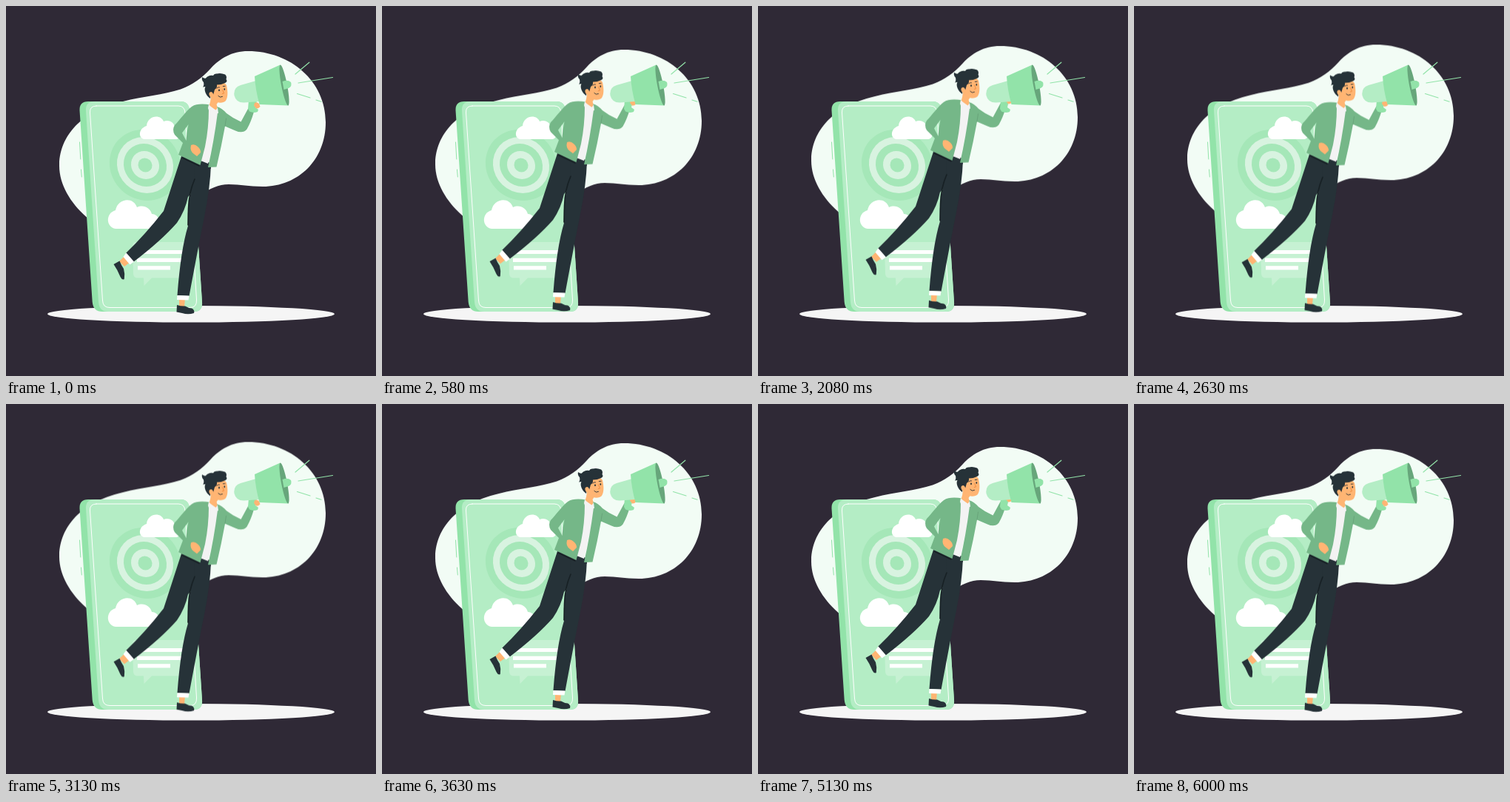
An HTML page for the animation above (6.04 s loop, 500 px wide and 500 px high).

```html
<!DOCTYPE html>
<html lang="en">
<head>
<meta charset="utf-8">
<title>Announcement</title>
<style>
  html, body { margin: 0; width: 100%; height: 100%; overflow: hidden; background: #2f2936; }
  svg { display: block; width: 100vw; height: 100vh; }
  .pale { fill: #f2fcf5; }
  .mint { fill: #b4edc5; }
  .green { fill: #92e3a9; }
  .ring { fill: #a5e7b8; }
  .glow { fill: #d8f3e0; }
  .bubble { fill: #c6f1d3; }
  .jacket { fill: #75b788; fill-rule: evenodd; }
  .dark { fill: #263238; }
  .skin { fill: #ffb573; }
  .white { fill: #fff; }
  .shirt { fill: #f3f3f3; }
  .line { fill: none; stroke-linecap: round; stroke-linejoin: round; }
</style>
</head>
<body>
<svg viewBox="0 0 500 500">
  <path id="blob" class="pale" d="M327 61C385 61 432 102 432 157C432 208 395 244 347 244C327 244 318 241 301 241C287 241 276 247 262 255C230 275 200 310 150 305C130 302 117 292 108.500 285C87 266 72 241 72 216C72 181 95 144 158 129C185 122 213 120 236 112.500C253 106 264 98 277 84C289 71 305 61 327 61Z"/>
  <path class="line" stroke="#92e3a9" d="M99.5 184L100.800 207M101.500 221L102.300 231"/>
  <ellipse cx="250" cy="416.300" rx="194" ry="11.300" fill="#f5f5f5"/>

  <g id="phone">
    <path class="green" d="M111 129H236Q247 129 248 141L265 400Q266 413 254 413H130Q118 413 116.700 400L99.500 141Q99 129 111 129Z"/>
    <path class="mint" d="M120 129H236Q247 129 248 141L265 400Q266 413 254 413H138Q126 413 125 400L108 142Q107 129 120 129Z"/>
    <path class="line" stroke="#fff" d="M122 135H233Q241 135 242 144L257.500 397Q258 407.500 249 407.500H140Q131 407.500 130.500 398L113.500 144Q113 135 122 135Z"/>
    <g id="target" transform="translate(188 215) skewX(3.7)"></g>
    <path class="white" d="M187 180C179 179 178 166 190 162C191 149 208 145 213 156C221 153 228 158 228 165C236 165 239 179 230 180Z"/>
    <path class="white" d="M148 301C135 299 134 280 148 276C151 260 172 257 177 272C186 268 195 273 197 281C208 281 212 299 200 301Z"/>
    <path class="bubble" d="M176 319H241Q245 319 245 324L247 363Q247 367 243 367.500H197L186.500 378L186 367.500H177Q172.500 367 172 362L171 324Q171 319 176 319Z"/>
    <path class="white" d="M176 330H240V335H176ZM177 340.800H240V346H177ZM178 351.300H222V356.600H178Z"/>
  </g>

  <g class="bob">
    <path class="dark" d="M237 203L213 277Q188 309 162 334L172 346Q210 317 231 293Q242 277 246 258L277 219V212Z"/>
    <path class="dark" d="M254 211L277 214Q276 245 268 285Q259 330 247.500 392L231.500 391Q236 330 246 297Q244 263 255 233Z"/>
    <path class="line" stroke="#172024" stroke-width="1.600" d="M255 234Q247 252 246.500 274L246 296M238 205L261 216"/>
    <path class="skin" d="M160 338L168 346L160 352L153 345ZM234 395H242L241 407H234Z"/>
    <path class="white" d="M162.500 333.500L173 345.500L167.500 349.500L158.500 339ZM231.500 391L247.500 391.500L246.500 397.500L231 397Z"/>
    <path class="dark" d="M145.500 349L153.500 344.500Q156 351 159 355Q161 362 159.800 369Q157 371 154.500 366Q151 357 145.500 349Z"/>
    <path class="dark" d="M231 404Q237 406 242 405.500Q246 408 251 408.500Q255.500 411 254 415Q246 417.500 238 415L230.500 413.500Z"/>

    <path class="shirt" d="M274 134L287 139L284 165L273 213L263 209Z"/>
    <path class="jacket" d="M276 133.500C266 132 257 132 251 136C243 142 235 154 228 161Q224 167 228 174L239 185L233 201L262.500 215L269 190Q274 165 274 139ZM246.500 160L238 171.500L243.500 182Q244 171 246.500 160Z"/>
    <path class="jacket" d="M285 136Q292 138 298 145Q307 152 317.500 156.500L327.500 138L335 143Q331 157 325.500 166.500Q320 173 310 168.500L296 162.500Q291 190 284.500 217.500L273 218Q281 183 286 144Z"/>
    <path class="line" stroke="#659f77" stroke-width=".8" d="M296 162L297.500 152"/>
    <path class="skin" d="M250 188Q255 186 259 190Q263 193 263 198L258 203L254 200Q248 196 250 188Z"/>

    <path class="skin" d="M277 119L288 128L284.500 133Q287 138 283 141L273.500 136.500Q277 130 277 119Z"/>
    <path class="shirt" d="M274 133L277 136L284 141L286 137L287 145L281 144L276 147L273 138Z"/>
    <path class="skin" d="M280 106C288 101 296 103 298 107C300 116 300 123 297 128C293 132 285 131.500 281 127L276 122Z"/>
    <path class="dark" d="M276 125C270 121 267 113 269.500 109L266 109.500Q268 107 267 103Q264 100 265 96Q268 98.500 270 97.500Q274 93 280 94Q281 91 285 91.500Q290 90 296 92.500Q299 95 297.500 99Q300 102 296 104Q291 106.500 285 106.500Q285.500 111 282 113Q281 117 280 120L277 118Z"/>
    <ellipse class="skin" cx="277.500" cy="120" rx="2.800" ry="4" transform="rotate(-18 277.500 120)"/>
    <ellipse class="dark" cx="288" cy="113.800" rx="1" ry="1.400"/>
    <ellipse class="dark" cx="295.300" cy="112.500" rx=".9" ry="1.300"/>
    <path class="line" stroke="#263238" stroke-width=".9" d="M284.800 111Q286.500 109.300 288.500 109.800M293.300 108.500L296 108.300"/>
    <path class="line" stroke="#ed893e" stroke-width=".9" d="M292.500 113L294.500 118L292.300 118.500"/>
    <path class="line" stroke="#263238" stroke-width=".9" d="M286.800 121.500Q289 124.500 292.500 122.500"/>
  </g>

  <path class="green" d="M328 127L339 128L337 137L341 140L340 143Q334 145 329 142.500L327 139Z"/>
  <path class="bob skin" d="M336 131Q339 129 342 132L343.500 136Q341 139 338 138.500L335 134.500Z"/>
  <path class="mint" d="M317 107L338 101L342 129L322 130.500Q311 131 308.500 121Q307 110 317 107Z"/>
  <path class="green" d="M336 95L370.500 79.500L381.500 134.500L342.500 133Q337 113 336 95Z"/>
  <ellipse cx="376" cy="107" rx="3.900" ry="28" fill="#67a67b" transform="rotate(-11 376 107)"/>
  <path class="green" d="M373.500 102Q381 99 385 103Q387 108 382 111L375.500 113Z"/>
  <path class="line" stroke="#92e3a9" stroke-width="1.200" d="M391 92L409.800 76.200M395 104L441.500 96.500M393.500 118.500L411 124M419 127L426 129.300"/>
</svg>
<script>
  const LOOP = 6040, RISE = 10;

  const target = document.getElementById('target');
  [48, 38, 29, 19, 9.5].forEach((r, i) => {
    const c = document.createElementNS('http://www.w3.org/2000/svg', 'circle');
    c.setAttribute('r', r);
    c.setAttribute('class', i % 2 ? 'glow' : 'ring');
    target.append(c);
  });

  // Constant-speed rise and fall, `times` round trips per loop.
  function float(el, times) {
    const anim = el.animate(
      [{ transform: 'translateY(0)' }, { transform: `translateY(${-RISE}px)` }],
      { duration: LOOP / times / 2, iterations: Infinity, direction: 'alternate' }
    );
    anim.startTime = document.timeline.currentTime;
  }

  float(document.getElementById('blob'), 1);
  document.querySelectorAll('.bob').forEach(el => float(el, 2));
</script>
</body>
</html>
```
